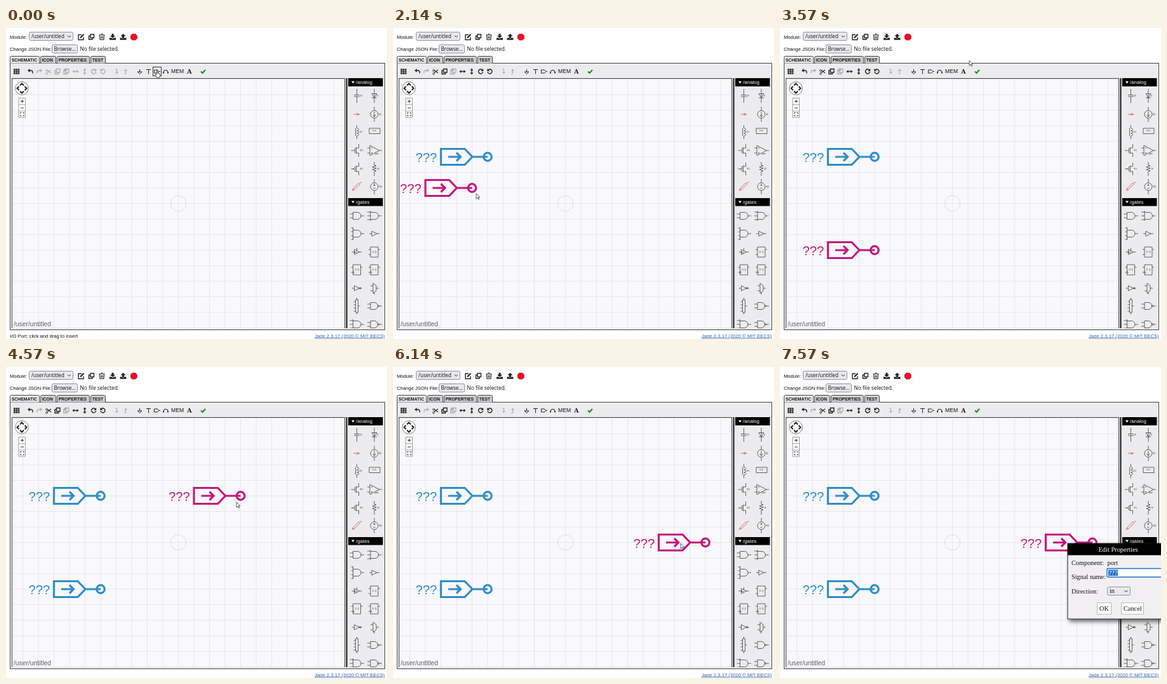
Recreate the animation shown at these times as an HTML page. Size 600 px wide and 490 px high, loop 8000 ms.

```html
<!DOCTYPE html>
<html lang="en">
<meta charset="utf-8">
<title>Schematic editor</title>
<style>
  html, body { margin: 0; width: 100%; height: 100%; overflow: hidden; background: #fff }
  svg { display: block }
  text { font: 7.65px "Liberation Sans", Arial, sans-serif; fill: #111; white-space: pre }
  .ui { font: 8.1px "Open Sans", sans-serif }
  .tab { font-weight: bold; font-size: 6.9px }
  .path { font-size: 10.3px; fill: #606064 }
  .dialog text { font: 10.3px "Liberation Serif", Times, serif }
  .white, .dialog .white { fill: #fff }
  .tiny { font-size: 3.2px; fill: #333 }
  .line { fill: none; stroke: #222; stroke-width: 1.4 }
  .thin { fill: none; stroke: #333; stroke-width: .75 }
  .off { opacity: .3 }
  .port path, .port circle { fill: none; stroke: currentColor; stroke-width: 3.2 }
  .port text { font-size: 20.2px; fill: currentColor }
</style>
<svg width="600" height="490" viewBox="0 0 600 490">
  <defs>
    <clipPath id="sheet"><path d="M10 80H533V472H10Z"/></clipPath>
    <clipPath id="shelf"><path d="M538 79H596V473H538Z"/></clipPath>
  </defs>

  <!-- header -->
  <text x="6" y="16.5">Module:</text>
  <rect x="36.5" y="6.5" width="69" height="13" rx="2" fill="#e9e9ed" stroke="#8f8f9d"/>
  <text class="ui" x="40" y="16">/user/untitled</text>
  <path class="line" style="stroke-width:1" d="M97 12l2.5 2.5 2.5-2.5"/>
  <text x="6" y="35.5">Change JSON File:</text>
  <rect x="72.5" y="26.5" width="40" height="13" rx="2" fill="#e9e9ed" stroke="#8f8f9d"/>
  <text class="ui" x="75.5" y="36">Browse...</text>
  <text class="ui" x="116.500" y="36" style="font-size:8.3px">No file selected.</text>
  <g id="headerIcons"></g>
  <path d="M198.800 9h5l3 3v4.500l-3 3h-5l-2.800-3v-4.500z" fill="#e8112d"/>

  <!-- frame and tabs -->
  <rect x="6.500" y="55.500" width="590" height="420" fill="#ececee" stroke="#444"/>
  <g id="tabs"></g>
  <g id="hover"><rect x="231.500" y="61.500" width="13" height="14" fill="#f4f4f5" stroke="#333"/></g>
  <g id="tools"></g>
  <text x="260" y="71.300" style="font-size:8.6px">MEM</text>
  <text x="285" y="72" style="font:bold 10.500px 'Liberation Serif',serif">A</text>
  <path d="M307 68.500l2.500 2.500 4.500-5" fill="none" stroke="#168a1b" stroke-width="1.900"/>

  <!-- drawing sheet -->
  <rect x="9.500" y="79.500" width="524" height="393" fill="#f9f8fb" stroke="#444"/>
  <path id="grid" fill="none" stroke="#e7e6ea"/>
  <circle cx="271.500" cy="276.500" r="12.200" fill="none" stroke="#dddce0"/>
  <text class="path" x="12" y="469.500">/user/untitled</text>
  <g id="ports" clip-path="url(#sheet)"></g>
  <circle cx="25" cy="95" r="10.300" fill="#fff" stroke="#666" stroke-width=".8"/>
  <path class="line" style="stroke-width:2" d="M22 90.500l3-3 3 3M22 99.500l3 3 3-3M20.500 92l-3 3 3 3M29.500 92l3 3-3 3"/>
  <path fill="#fff" stroke="#888" stroke-width=".8" d="M20 110.500h10.500v30.500h-10.500zM20 120.700h10.500M20 131h10.500"/>
  <path class="line" style="stroke-width:.9" d="M23 115.500h5M25.500 113v5M23 126h5M22.700 135v-1.500h1.700M26.600 133.500h1.700v1.500M28.300 137v1.500h-1.700M24.400 138.500h-1.700v-1.500"/>

  <!-- parts shelf -->
  <path d="M536.500 79V473" stroke="#222" stroke-width="2.200"/>
  <path d="M539 79h54.500v13h-54.500zM539 268h54.500v12.500h-54.500z"/>
  <path class="white" d="M544 84h5l-2.500 3.500zM544 272.500h5l-2.500 3.500z"/>
  <text class="white" x="551" y="88" style="font-size:7.9px">/analog</text>
  <text class="white" x="551" y="276.500" style="font-size:7.9px">/gates</text>
  <g id="parts" clip-path="url(#shelf)"></g>

  <!-- footer -->
  <text id="status" x="6" y="487.500">I/O Port: click and drag to insert</text>
  <text x="486" y="487.500" style="fill:#2a66b0;text-decoration:underline;font-size:7.7px">Jade 2.3.17 (2020 © MIT EECS)</text>

  <g id="dialog" class="dialog">
    <rect x="453" y="278" width="158" height="119" style="filter:drop-shadow(3px 4px 3px #0008)" fill="#f1eff2" stroke="#222"/>
    <path d="M453 278h150v18.500h-150z"/>
    <text class="white" x="501.500" y="290.500" style="font-size:10.400px">Edit Properties</text>
    <text x="459" y="311.500">Component:</text>
    <text x="515.500" y="311.500">port</text>
    <text x="459" y="333.500">Signal name:</text>
    <rect x="515" y="317.500" width="95" height="13.500" rx="1.500" fill="#fff" stroke="#1a6fd0" stroke-width="1.500"/>
    <path d="M517 319.500h15v9.500h-15z" fill="#2070c8"/>
    <text class="white" x="517.500" y="327.800">???</text>
    <text x="459" y="356.500">Direction:</text>
    <rect x="515.500" y="346.500" width="36" height="13" rx="2" fill="#e9e9ed" stroke="#8f8f9d"/>
    <text x="519" y="356">in</text>
    <path class="line" style="stroke-width:1" d="M542.500 352l2.500 2.500 2.500-2.500"/>
    <path d="M499.500 371.500h22v18h-22zM537.500 371.500h35v18h-35z" fill="#fff" stroke="#bbb"/>
    <text x="503" y="384">OK</text>
    <text x="541" y="384">Cancel</text>
  </g>
  <path id="arrow" d="M0 0V8.200L2 6.300 3.500 9.300 4.700 8.700 3.300 5.800H5.800Z" fill="#fff" stroke="#333" stroke-width=".8"/>
  <path id="hand" d="M-1 0c0-1.400 1.800-1.400 1.800 0v3.300l3.700 1v3.200l-1 2.500h-4l-3-4.500c0-1.200 1.300-1 2.500.5z" fill="#fff" stroke="#222" stroke-width=".8"/>
</svg>
<script>
const $ = id => document.getElementById(id);
const at = (x, y, body, cls = "") => `<g class="${cls}" transform="translate(${x} ${y})">${body}</g>`;
const line = (d, extra = "") => `<path class="line" d="${d}" ${extra}/>`;
const solid = d => `<path fill="#222" d="${d}"/>`;

// Header and tabs
const copy = line("M-1.500-4h5.500v5.500h-5.500zM-1.500-1.500h-2.500v5.500h5.500v-2.500");
const tray = solid("M-5 1.500h3l2 1.500 2-1.500h3v3.300h-10z");
$("headerIcons").innerHTML =
  at(118, 14, line("M1-3.500h-5v8h8v-4") + line("M-1 1.500l5.500-5.500", 'style="stroke-width:2.200"')) +
  at(134.500, 14, copy) +
  at(151, 14, line("M-4.500-3h9M-1.500-4.500h3M-3.500-3l.5 7.500h6l.5-7.500M-1-1v4M1-1v4", 'style="stroke-width:1.100"')) +
  at(168, 14, tray + solid("M-1.500-5h3v3h2.500l-4 4-4-4h2.500z")) +
  at(184.500, 14, tray + solid("M-1.500 2h3v-3h2.500l-4-4-4 4h2.500z"));

const tabs = [["SCHEMATIC", 6, 46], ["ICON", 54, 24], ["PROPERTIES", 80, 51], ["TEST", 133, 23]];
$("tabs").innerHTML = tabs.map(([name, x, w], i) =>
  `<path d="M${x + .5} 55.500v-9q0-2 2-2h${w - 4}q2 0 2 2v9" fill="${i ? "#cfcfd2" : "#ececee"}" stroke="#444"/>
   <text class="tab" x="${x + 2.700}" y="52.700">${name}</text>`).join("");

// Toolbar: "sel" icons need a selection, "off" icons stay grey
const undo = line("M-2-1.500h3q3 0 2.500 4.500") + solid("M-4.500-1.500l3.500-3v6z");
const turn = line("M2.500-2.500a3.500 3.500 0 1 0 1 3") + solid("M4.200-4.500v4h-4z");
const span = line("M-3 0h6") + solid("M-5 0l3-2.500v5zM5 0l-3-2.500v5z");
const flip = s => `<g transform="scale(-1 1)">${s}</g>`;
const hook = line("M-2.500-3.500h2.500v5", 'style="stroke-width:1.200"') + solid("M-2.500 1h5l-2.500 3z");
const tools = [
  [16.500, solid([-3, 0, 3].map(y => [-4.500, -1.200, 2.100].map(x => `M${x} ${y - 1.200}h2.600v2.400h-2.600z`).join("")).join(""))],
  [38.500, undo], [52.500, flip(undo), "off"],
  [67, line("M-2-2l6 4.500M-2 2l6-4.500", 'style="stroke-width:1.100"') +
    line("M-4-2.500a1.400 1.400 0 1 0 .1-.1M-4 2.500a1.400 1.400 0 1 0 .1-.1", 'style="stroke-width:1"'), "sel"],
  [81, copy, "sel"], [95, copy + solid("M-4-4h5v3h-5z"), "off"],
  [109.500, span, "sel"], [124, `<g transform="rotate(90)">${span}</g>`, "sel"],
  [138, turn, "sel"], [152.500, flip(turn), "sel"],
  [174.500, hook, "off"], [188.500, `<g transform="scale(1 -1)">${hook}</g>`, "off"],
  [210.500, line("M0-3.500v4M-3.500.500h7l-3.500 3.500z", 'style="stroke-width:1"')],
  [224.500, line("M-3.500-3h7M0-3v7", 'style="stroke-width:1"')],
  [238, line("M-4.500-2.500h5l2.500 2.500-2.500 2.500h-5zM3 0h2", 'style="stroke-width:1"')],
  [251.500, line("M-3.500 2q0-4 3.500-4t3.500 4", 'style="stroke-width:1.100"') + solid("M-4.500 1h2v2h-2zM2.500 1h2v2h-2z")]
];
$("tools").innerHTML = tools.map(([x, body, cls]) => at(x, 68.500, body, cls)).join("");
const selectionTools = document.querySelectorAll(".sel");

// Sheet grid
const CELL = 24.5, CX = 271.5, CY = 276.5;
let grid = "";
for (let i = -10; i <= 10; i++) {
  grid += `M${CX + i * CELL} 80V472`;
  if (Math.abs(i) < 9 && CY + i * CELL > 80) grid += `M10 ${CY + i * CELL}H533`;
}
$("grid").setAttribute("d", grid);

// Shelf: two columns of small symbols
const ring = "M-6 0a6 6 0 1 0 12 0a6 6 0 1 0-12 0M0-12v6M0 6v6";
const mos = "M-9 0h5M-3-4v8M-1-5v10M-1-4h4v-6M-1 4h4v6";
const and = "M-11-3h5M-11 3h5M-6-5.500h7a5.500 5.500 0 0 1 0 11h-7zM6.500 0h5";
const and3 = "M-11-6h5M-11 0h5M-11 6h5M-6-8v16M-6-5.500h7a5.500 5.500 0 0 1 0 11h-7M6.500 0h5";
const nand = "M-11-3h5M-11 3h5M-6-5.500h6a5.500 5.500 0 0 1 0 11h-6zM5.500 0a1.200 1.200 0 1 0 2.400 0a1.200 1.200 0 1 0-2.400 0M8 0h4";
const buffer = "M-8 0h4M-4-4v8l8-4zM4 0h4";
const box = "M-6-8h12v16h-12zM-9-4h3M-9 4h3M6-4h3";
const RED = "#d8324a";
const parts = [
  [107, "M0-11v9.500M-4.500-1.500h9M-4.500 1h9M0 1v10", "1F", 5], [107, "M0-11v22M-4-3.500h8l-4 6.500zM-4 3h8", "D", 4],
  [136, "M-5 0h10M0-2l3 2-3 2", "", 0, RED], [136, ring + "M0-4v7M-2 1l2 3 2-3", "I(t)", 7],
  [164, "M0-11v5c4 0 4 4 0 4c4 0 4 4 0 4c4 0 4 4 0 4v5M-2-6v12", "1H", 4], [162, "M-8-4h17v8.500h-17z", "V=0", -3],
  [193, mos, "8/1", 5], [193, "M-7-8v16l15-8zM-11-4h4M-11 4h4M8 0h4M-5-4h2M-5 4h2M-4 3v2", "gain", 1, "", 6],
  [222, mos + "M-5.500-1v2", "8/1", 5], [222, "M0-11v5l3 1-6 2 6 2-6 2 6 2-3 1v7", "1K", 4],
  [250, "M-7 6l3-1 9-9-2-2-9 9-1 3M5-6l3-1M-4 5l-2-2", "", 0, RED], [250, ring + "M0-4v3M-1.500-2.500h3M-1.500 2.500h3", "V(t)", 7],
  [296, and], [296, and3],
  [324, "M-9-9h3M-9-3h3M-9 3h3M-9 9h3M-6-10v20M-6-5.500h7a5.500 5.500 0 0 1 0 11h-7M6.500 0h5"], [324, buffer],
  [353, buffer + "M0-6v4M-3-1v2h3"], [353, box, "D  Q", -3],
  [381, box + "M-6 2l2 2-2 2", "D  Q", -3], [381, box + "M-6 2l2 2-2 2", "D  Q", -3],
  [410, buffer + "M4 0a1.200 1.200 0 1 0 2.400 0a1.200 1.200 0 1 0-2.400 0"], [410, "M-2-8l5 4v8l-5 4zM-6-4h4M-6 4h4M3 0h4M0 6v4"],
  [438, "M-2-10h4v20h-4zM-5-7h3M-5-2h3M-5 3h3M-5 8h3M0-13v3M0 10v3M2 0h3"], [438, nand],
  [467, and3], [467, nand]
];
$("parts").innerHTML = parts.map(([y, d, label = "", x = 0, color, dy = 1], i) =>
  at(i % 2 ? 580 : 552.5, y, `<path class="thin" d="${d}" ${color ? `style="stroke:${color}"` : ""}/>
    <text class="tiny" x="${x}" y="${dy}">${label}</text>`)).join("");

// Cursor way points: tick, x, y
const TICKS_PER_SECOND = 7, LOOP = 8000;
const way = [
  [0, 238, 68], [1, 230, 92], [3, 171, 181], [5, 151, 207], [6, 151, 207],
  [9, 222, 79], [10, 238, 68], [11, 222, 104], [12, 178, 170], [13, 178, 170],
  [15, 131, 261], [17, 136, 306], [19, 148, 344], [20, 148, 344], [21, 151, 331],
  [22, 212, 190], [23, 298, 51], [25, 298, 51], [26, 238, 68], [27, 287, 128], [29, 363, 212],
  [32, 363, 213], [35, 428, 246], [38, 487, 280], [39, 489, 283], [41, 489, 283],
  [43, 453, 278], [56, 453, 278]
];
const drags = [[1, 5], [11, 20], [27, 39]];
const hovers = [0, 10, 26];
const DIALOG_TICK = 45;

function cursorAt(tick) {
  const i = Math.max(1, way.findIndex(p => p[0] >= tick));
  const [t0, x0, y0] = way[i - 1], [t1, x1, y1] = way[i];
  const k = (tick - t0) / (t1 - t0);
  return [x0 + (x1 - x0) * k, y0 + (y1 - y0) * k];
}
const snap = (v, origin) => origin + Math.round((v - origin) / CELL) * CELL;
const show = (el, on) => el.style.display = on ? "" : "none";
const move = (el, x, y) => el.setAttribute("transform", `translate(${x} ${y})`);

$("ports").innerHTML = drags.map(() => `<g class="port">
  <path d="M-73.500-12.500h37.500l12 12.500-12 12.500h-37.500zM-24 0H0M-62 0h19M-49-6.500l6.500 6.500-6.500 6.500"/>
  <circle r="6.300"/><text x="-113.500" y="8">???</text></g>`).join("");
const ports = [...$("ports").children];

function draw(time) {
  const tick = Math.floor((time % LOOP + 4) * TICKS_PER_SECOND / 1000);
  const hovering = hovers.includes(tick), editing = tick >= DIALOG_TICK;
  const latest = drags.filter(d => d[0] <= tick).length - 1;
  ports.forEach((port, i) => {
    show(port, i <= latest);
    const [x, y] = cursorAt(Math.min(tick, drags[i][1]));
    move(port, snap(x, CX), snap(y, CY));
    port.style.color = i === latest ? "#c4187c" : "#2f8ecb";
  });
  selectionTools.forEach(el => el.classList.toggle("off", latest < 0));
  show($("hover"), hovering);
  show($("status"), hovering);
  show($("dialog"), editing);
  show($("hand"), hovering);
  show($("arrow"), !hovering && !editing);
  const cursor = cursorAt(tick);
  move($("arrow"), ...cursor);
  move($("hand"), ...cursor);
}
function loop(now) {
  draw(now);
  requestAnimationFrame(loop);
}
draw(0);
requestAnimationFrame(loop);
</script>
</html>
```
